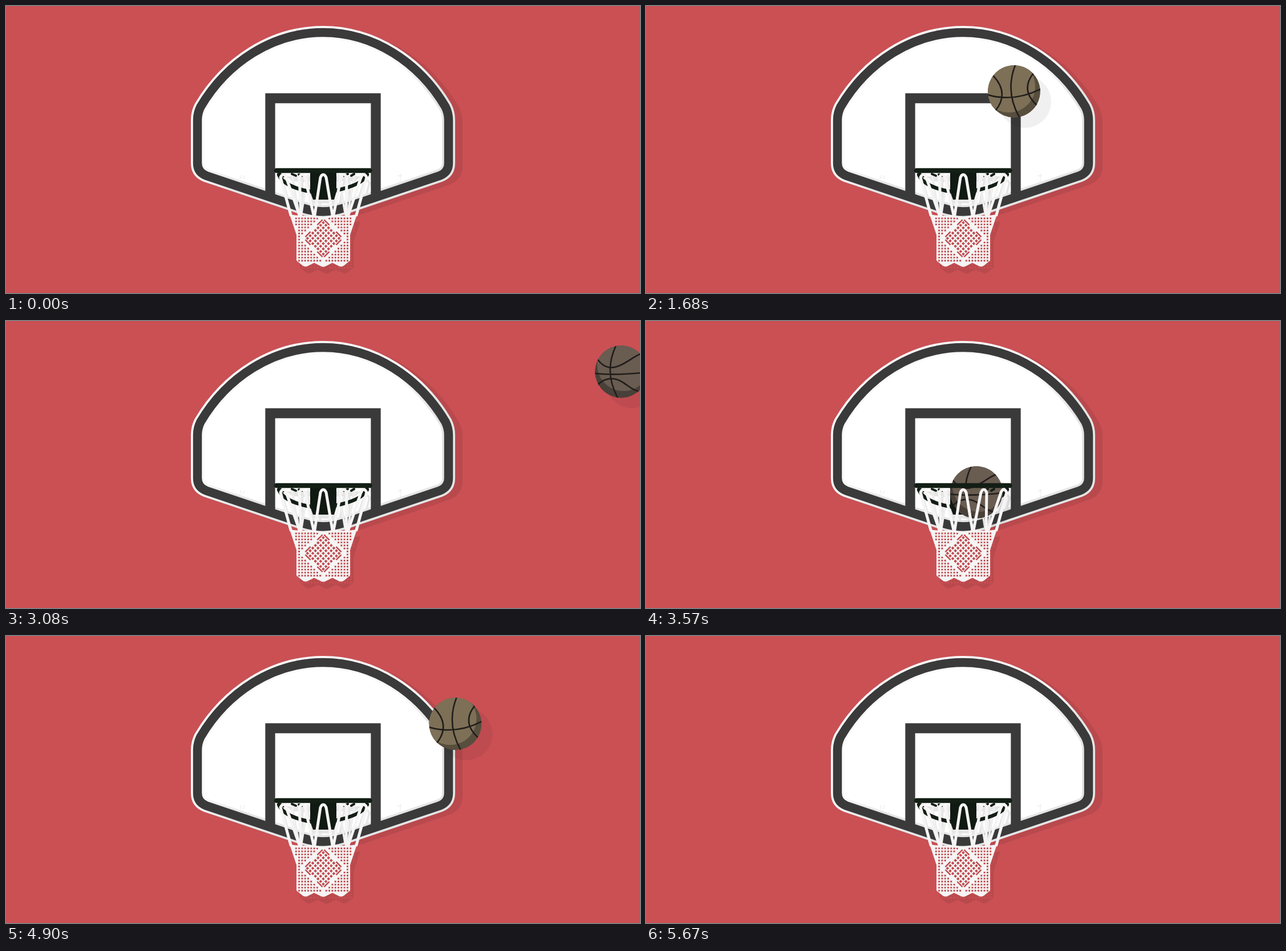
An HTML page for the animation above (6300 ms loop, 1111x504 px).

```html
<!DOCTYPE html>
<html lang="en">
<head>
<meta charset="utf-8">
<title>Basketball hoop</title>
<style>
  html, body { margin: 0; width: 100%; height: 100%; overflow: hidden; background: #ca5054; }
  svg { display: block; width: 100vw; height: 100vh; }
  .line { fill: none; stroke-linecap: round; stroke-linejoin: round; }
</style>
</head>
<body>
<svg viewBox="0 0 1111 504">
  <defs>
    <linearGradient id="edge" gradientUnits="userSpaceOnUse" x1="324" y1="283" x2="354" y2="343">
      <stop stop-color="#fafafa"/><stop offset="1" stop-color="#e5e5e5"/>
    </linearGradient>
    <path id="board" d="M335.5 200Q335.5 188 341 177C387 99 467 46.5 555.5 46.5S724 99 770 177Q775.5 188 775.5 200V276Q775.5 292 760 298L591 355Q572 361 555.5 361T520 355L351 298Q335.5 292 335.5 276Z"/>
    <clipPath id="round"><circle r="46"/></clipPath>
    <clipPath id="inside"><use href="#board"/></clipPath>
    <path id="net" fill-rule="evenodd"/>
    <path id="strings" class="line"/>
  </defs>

  <rect width="1111" height="504" fill="#ca5054"/>
  <use href="#board" transform="translate(13 5)" fill="#b9494d" stroke="#b9494d" stroke-width="23"/>
  <use href="#board" fill="#fff" stroke="url(#edge)" stroke-width="23"/>
  <g clip-path="url(#inside)">
    <use href="#strings" transform="translate(5 10)" stroke="#e6e6e6" stroke-width="4"/>
    <path d="M491 299H622L612 308H502ZM536 340H577V347H536Z" fill="#e6e6e6"/>
  </g>
  <use href="#board" fill="none" stroke="#3a3a3a" stroke-width="15.5"/>
  <path d="M463 331V162H648V331" fill="none" stroke="#3a3a3a" stroke-width="17.3"/>
  <path d="M412 297l-1 7M418 297l-2 7M686 298h8M691 295v15" stroke="#e9e9e9" fill="none"/>

  <!-- bracket and far side of the rim -->
  <path d="M533 293H579V326L575 340H538L533 326Z" fill="#101a12"/>
  <path class="line" d="M501 297L513 362M529 297L518 362M583 297L594 362M611 297L599 362" stroke="#eeeeee" stroke-width="4"/>
  <path class="line" d="M478 296Q486 317 533 326M633 296Q625 314 578 324" stroke="#131e15" stroke-width="6.5"/>
  <use href="#net" transform="translate(6 12)" fill="#b9494d"/>

  <g id="ball">
    <circle cx="19" cy="18" r="46" opacity=".06"/>
    <g clip-path="url(#round)">
      <circle id="shade" r="46"/>
      <circle id="lit" r="46"/>
      <path id="seams" class="line" stroke="#211d1b" stroke-width="2.6"/>
    </g>
  </g>

  <!-- near side of the rim and net -->
  <path class="line" d="M481 295l5 4M501 295l7 3M513 296l7 2M592 298l7-3M605 298l5-3M625 299l6-4" stroke="#131e15" stroke-width="4"/>
  <use href="#strings" stroke="#f6f4f4" stroke-width="5"/>
  <use href="#net" fill="#f6f4f4"/>
  <path class="line" d="M474 289H637.5" stroke="#131e15" stroke-width="8.5"/>
</svg>
<script>
const $ = id => document.getElementById(id);
const STEP = 70, LOOP = 6300, CX = 556, CY = 408;

// Closed rectangle of w by h around a point, turned by a.
function hole(x, y, w, h, a = 0) {
  const c = Math.cos(a), s = Math.sin(a);
  return 'M' + [[-1, -1], [1, -1], [1, 1], [-1, 1]].map(([i, j]) => {
    const u = i * w / 2, v = j * h / 2;
    return `${(x + u * c - v * s).toFixed(2)} ${(y + u * s + v * c).toFixed(2)}`;
  }).join('L') + 'Z';
}

function netPath() {
  let d = 'M497 366Q518 370 540 367Q556 373 572 367Q594 370 615 366L603 402V447' +
    'L592 456Q587 459 582 456L572 451L562 456Q556 460 550 456L540 451L530 456Q525 459 520 456L509 447V402Z';
  // fine mesh in the corners
  for (let y = 373; y < 452; y += 5.3)
    for (let i = -10; i <= 10; i++) {
      const dx = i * 5.3, half = y < 402 ? 55 - (y - 368) * .35 : 44;
      if (Math.abs(dx) < half - 1 && Math.abs(dx) + Math.abs(y - CY) > 43)
        d += hole(CX + dx, y, 2.9, 2.9);
    }
  // diamond mesh in the middle
  const q = Math.PI / 4;
  for (let i = -3; i <= 3; i++)
    for (let j = -3; j <= 3; j++)
      d += hole(CX + (i - j) * 4.6, CY + (i + j) * 4.6, 4, 4, q);
  // broken border of the diamond
  for (const sx of [-1, 1])
    for (const sy of [-1, 1])
      for (const k of [6, 27])
        d += hole(CX + sx * k, CY + sy * (34 - k), 13, 2.4, -sx * sy * q);
  return d;
}

// Each loop hangs from the rim at x and ends in two knots.
const loops = [[486, 499, 514], [519, 517, 539], [556, 541, 572], [592, 574, 596], [627, 600, 614]];
$('strings').setAttribute('d', loops.map(([x, a, b]) =>
  `M${a} 367L${x - 5} 301Q${x} 291 ${x + 5} 301L${b} 367`).join(''));
$('net').setAttribute('d', netPath());

const olive = {
  lit: '#7d7057', shade: '#574e3d', at: [-9, -9],
  seams: 'M-37-28Q-8 2-32 33M2-46Q-16 0 9 45M34-32Q10-2 41 25M-46 6Q0 19 46-4'
};
const brown = {
  lit: '#695c51', shade: '#494039', at: [4, -12],
  seams: 'M-46 3Q-10 7 46 1M-9-46Q-31 0-6 46M-41-21C-28-4-14-4 4-14S24-28 36-32M-42 24C-30 11-14 9 0 17S20 34 38 36'
};

// Height of a throw: slows up to its top, then speeds up downward.
const arc = (n, from, top, peak, fall) =>
  n < peak ? top + (from - top) * (1 - n / peak) ** 2 : top + fall * (n - peak) ** 2;

function hitRight(n) {
  if (n <= 9) return [-3 + 72 * n, arc(n, 242, 40, 6.13, 13.36)];
  return [645 + 102 * (n - 9), 150 - 40 * (n - 9)];
}
function score(n) {
  if (n <= 7) return [1078 - 71.3 * n, arc(n, 89, 65, 1.69, 8.37)];
  const k = n - 7;
  return [579 - 13.5 * k + 1.8 * k * k, 301 + 69 * k + k * k];
}
function hitLeft(n) {
  if (n <= 9) return [1119 - 82.9 * n, arc(n, 419, 101, 6.776, 13.36)];
  const k = n - 9;
  return [373.5 - 64.6 * k, 167 + 13.36 * k * k];
}
const shots = [
  { start: 15, count: 14, path: hitRight, skin: olive },
  { start: 44, count: 11, path: score, skin: brown },
  { start: 66, count: 15, path: hitLeft, skin: olive }
];

function draw(ms) {
  const step = Math.floor(ms % LOOP / STEP + 1e-6);
  const shot = shots.find(s => step >= s.start && step < s.start + s.count);
  $('ball').style.display = shot ? '' : 'none';
  if (!shot) return;
  const { skin } = shot;
  $('ball').setAttribute('transform', `translate(${shot.path(step - shot.start)})`);
  $('shade').setAttribute('fill', skin.shade);
  $('lit').setAttribute('fill', skin.lit);
  $('lit').setAttribute('transform', `translate(${skin.at})`);
  $('seams').setAttribute('d', skin.seams);
}

const began = performance.now();
function tick() {
  draw(performance.now() - began);
  requestAnimationFrame(tick);
}
tick();
</script>
</body>
</html>
```
